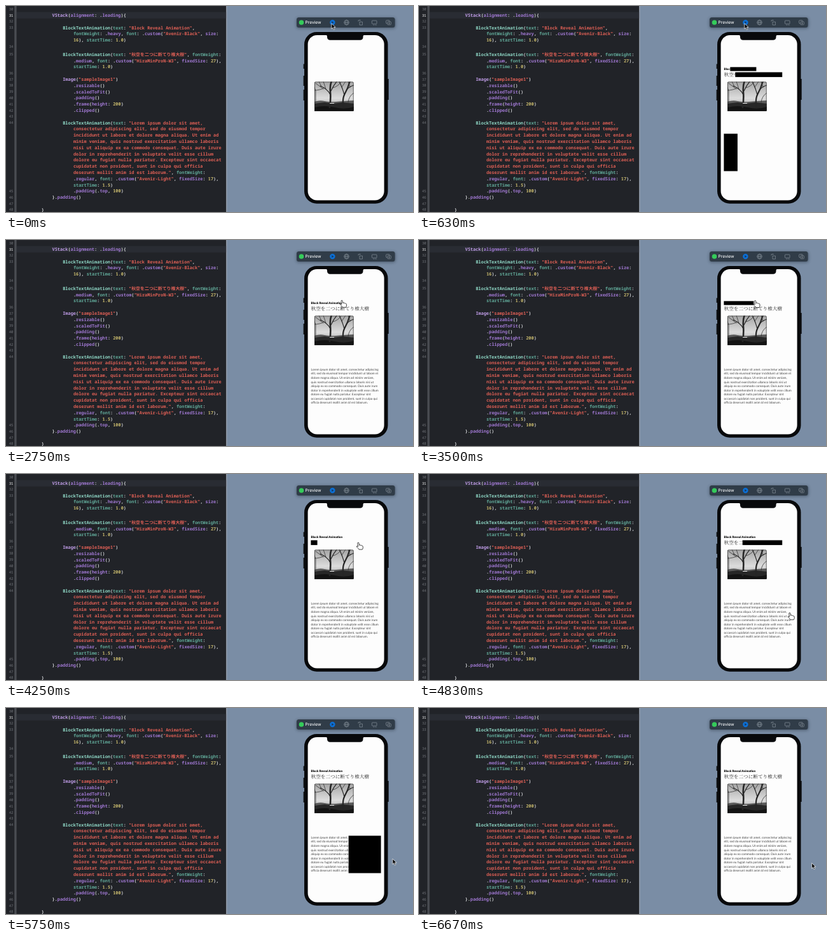
An HTML page for the animation above (6710 ms loop, 640 px wide and 325 px high).

```html
<!DOCTYPE html>
<html lang="en">
<head>
<meta charset="utf-8">
<style>
  html, body { margin: 0; width: 100%; height: 100%; overflow: hidden; background: #7a8da5; }
  svg { display: block; width: 100vw; height: 100vh; }
  text { white-space: pre; text-rendering: geometricPrecision; }
  .code { font: 600 6.93px "Noto Sans Mono", "Noto Sans CJK JP", "DejaVu Sans Mono", monospace; fill: #d3d5d8; }
  .num { font: 5.8px "Noto Sans Mono", monospace; fill: #6f7278; text-anchor: end; }
  .num.active { fill: #fff; }
  .string { fill: #dd5f55; }
  .number { fill: #c3b56b; }
  .own { fill: #8fd8c6; }
  .label { fill: #61a999; }
  .type { fill: #bf9ce6; }
  .member { fill: #a078d2; }
  .title { font: 900 4.65px Lato, sans-serif; }
  .haiku { font: 7.63px "Noto Serif CJK JP", "Noto Sans CJK JP", serif; fill: #222; }
  .body { font: 4.8px Lato, sans-serif; fill: #3c3c3c; }
  .bar { font: 500 6.6px Inter, sans-serif; fill: #f1f3f5; }
</style>
</head>
<body>
<svg viewBox="0 0 640 325" preserveAspectRatio="none">
  <rect width="640" height="325" fill="#7a8da5"/>
  <rect width="346.4" height="325" fill="#212328"/>
  <rect x="16.5" y="9.5" width="329.9" height="10.2" fill="#292c33"/>
  <rect x="13.2" width="3.4" height="325" fill="#494c52"/>
  <rect x="346.4" width="1" height="325" fill="#a3a9b1"/>
  <g id="editor"></g>

  <filter id="soft" x="-10%" y="-60%" width="120%" height="220%"><feGaussianBlur stdDeviation="2"/></filter>
  <rect x="456.5" y="18.6" width="156" height="16.8" rx="4" fill="#26323f" opacity=".5" filter="url(#soft)"/>
  <rect x="457" y="18" width="154.6" height="16" rx="3.5" fill="#303c48"/>
  <circle cx="464.5" cy="26" r="3.8" fill="#35cb5a"/>
  <text class="bar" x="470.5" y="28.4">Preview</text>
  <circle cx="513.4" cy="26" r="4.2" fill="#0b6fd6"/>
  <path d="M512.2 23.9v4.2l3.4-2.1z" fill="#173b63"/>
  <g fill="none" stroke="#88929d" stroke-width=".7">
    <circle cx="535.5" cy="26" r="3.8"/>
    <ellipse cx="535.5" cy="26" rx="1.7" ry="3.8"/>
    <path d="M531.7 26h7.6M554 24.4v-1.8h3.4l-1-1M556 25h4.4v5h-4.4z"/>
    <rect x="575.4" y="23" width="7.6" height="5.2" rx=".8"/>
    <path d="M577.4 30h2M580.6 30h2"/>
    <rect x="597.6" y="22.6" width="5.6" height="5" rx="1"/>
    <rect x="599.8" y="24.6" width="5.6" height="5" rx="1" fill="#303c48"/>
    <path d="M601.2 27.1h2.8M602.6 25.7v2.8"/>
  </g>

  <path d="M468.6 91.5v7.5M468.6 110v16M468.6 132v17M600.8 115v33" stroke="#17191d" stroke-width="2"/>
  <rect x="469" y="41" width="131.5" height="270.8" rx="19.5" fill="#08090b"/>
  <rect x="474.6" y="46" width="120" height="260.5" rx="14.5" fill="#fdfdfd"/>
  <path d="M503 45.5h60.5q-2 .5-2 2.5v1q0 4.8-5 4.8h-46.5q-5 0-5-4.8v-1q0-2-2-2.5z" fill="#08090b"/>

  <clipPath id="photo"><rect x="485" y="119.5" width="61.6" height="46.5" rx="1.5"/></clipPath>
  <linearGradient id="sky" x2="0" y2="1">
    <stop stop-color="#a4a4a4"/><stop offset=".55" stop-color="#dcdcdc"/><stop offset="1" stop-color="#999"/>
  </linearGradient>
  <g clip-path="url(#photo)">
    <rect x="485" y="119" width="62" height="48" fill="url(#sky)"/>
    <path d="M485 151q8-3 16-1t18 1 28-2v18h-62z" fill="#5a5a5a"/>
    <path d="M485 154l16-2 14 2 14-2 18 2v13h-62z" fill="#272727"/>
    <path d="M485 160q16-4 32 0t30-1v8h-62z" fill="#131313"/>
    <g fill="none" stroke="#262626" stroke-linecap="round">
      <path d="M509 160q2-14 1-24t2-18" stroke-width="2.6"/>
      <path d="M531 160q-3-13 2-22t8-20" stroke-width="2.2"/>
      <path d="M510 140q-4-9-16-14M511 134q4-9 10-16M532 141q-2-10-8-22M536 132q4-5 11-7" stroke-width="1.2"/>
      <path d="M485 133q9 0 16-4M496 127l-4-8M503 131l-4-12M514 129q8-2 13-9M487 152v-18l-2-6M538 152q1-10 9-15M528 128l6-9M541 128l-3-9M487 122l12 9" stroke-width=".7"/>
    </g>
    <path d="M509 153.5h7" stroke="#eee" stroke-width="1.2"/>
    <rect x="485.3" y="119.8" width="61" height="45.9" rx="1.5" fill="none" stroke="#222" stroke-width=".9"/>
  </g>

  <g id="reveals"></g>
  <path id="arrow" d="M0 0v8.6l2-1.9 1.4 3.2 1.6-.7-1.4-3.1h2.8z" fill="#08090b" stroke="#fff" stroke-width=".7"/>
  <path id="hand" d="M-1.2 1q0-1.2 1.1-1.2t1.1 1.2l.6 3.2.3-.6q1.2-.4 1.7.6 1.4-.5 1.8.6 1.5-.3 1.8 1.2l.1 2.4q-.2 1.5-1 2.4h-5.2q-.7-1.5-2.3-2.8-2-1.6-1.5-2.3t2.3.4z" fill="#fff" stroke="#111" stroke-width=".8" stroke-linejoin="round"/>
</svg>
<script>
const LOOP = 6710;
const HALF = 500;
const $ = id => document.getElementById(id);

function add(parent, tag, attrs = {}, content = '') {
  const node = document.createElementNS('http://www.w3.org/2000/svg', tag);
  for (const key in attrs) node.setAttribute(key, attrs[key]);
  node.textContent = content;
  return parent.appendChild(node);
}

// Each row: line number | indent level | code
const source = `30|0|
31|1|VStack(alignment: .leading){
32|0|
33|2|BlockTextAnimation(text: "Block Reveal Animation",
|3|fontWeight: .heavy, font: .custom("Avenir-Black", size:
|3|16), startTime: 1.0)
34|0|
35|2|BlockTextAnimation(text: "秋空を二つに断てり椎大樹", fontWeight:
|3|.medium, font: .custom("HiraMinProN-W3", fixedSize: 27),
|3|startTime: 1.0)
36|0|
37|2|Image("sampleImage1")
38|3|.resizable()
39|3|.scaledToFit()
40|3|.padding()
41|3|.frame(height: 200)
42|3|.clipped()
43|0|
44|2|BlockTextAnimation(text: "Lorem ipsum dolor sit amet,
|3|consectetur adipiscing elit, sed do eiusmod tempor
|3|incididunt ut labore et dolore magna aliqua. Ut enim ad
|3|minim veniam, quis nostrud exercitation ullamco laboris
|3|nisi ut aliquip ex ea commodo consequat. Duis aute irure
|3|dolor in reprehenderit in voluptate velit esse cillum
|3|dolore eu fugiat nulla pariatur. Excepteur sint occaecat
|3|cupidatat non proident, sunt in culpa qui officia
|3|deserunt mollit anim id est laborum.", fontWeight:
|3|.regular, font: .custom("Avenir-Light", fixedSize: 17),
|3|startTime: 1.5)
45|3|.padding(.top, 100)
46|1|}.padding()
47|0|
48|0|}`;

function tokenClass(token) {
  if (/^\d/.test(token)) return 'number';
  if (token === 'BlockTextAnimation') return 'own';
  if (/^(text|fontWeight|font|startTime)$/.test(token)) return 'label';
  if (/^(VStack|Image)$/.test(token)) return 'type';
  return /^\w/.test(token) ? 'member' : '';
}

function drawEditor() {
  let inString = false;
  source.split('\n').forEach((row, i) => {
    const [number, indent, code] = row.split('|');
    const y = 7.1 + 9.8 * i + (i > 6 ? 3 : 0);
    add($('editor'), 'text', { class: number === '31' ? 'num active' : 'num', x: 11.6, y: y - .3 }, number);
    const line = add($('editor'), 'text', { class: 'code', x: 55.8 + 16.7 * indent, y });
    for (const token of code.match(/"|[\d.]*\d|[A-Za-z]\w*|[^\w"]+|\w+/g) || []) {
      const quote = token === '"';
      add(line, 'tspan', { class: inString || quote ? 'string' : tokenClass(token) }, token);
      if (quote) inString = !inString;
    }
  });
}

const paragraph = `Lorem ipsum dolor sit amet, consectetur adipiscing
elit, sed do eiusmod tempor incididunt ut labore et
dolore magna aliqua. Ut enim ad minim veniam,
quis nostrud exercitation ullamco laboris nisi ut
aliquip ex ea commodo consequat. Duis aute irure
dolor in reprehenderit in voluptate velit esse cillum
dolore eu fugiat nulla pariatur. Excepteur sint
occaecat cupidatat non proident, sunt in culpa qui
officia deserunt mollit anim id est laborum.`;

const LEFT = 479.4;
const reveals = [
  { style: 'title', text: 'Block Reveal Animation', baseline: 101, top: 96.4, width: 51, height: 6.2, starts: [-22, 3100] },
  { style: 'haiku', text: '秋空を二つに断てり椎大樹', baseline: 111.2, top: 104.5, width: 91.8, height: 7.6, starts: [-22, 4135] },
  { style: 'body', text: paragraph, baseline: 205.9, top: 201.5, width: 110.2, height: 59, starts: [478, 4990] }
];

for (const r of reveals) {
  const id = 'clip-' + r.style;
  r.clip = add(add($('reveals'), 'clipPath', { id }), 'rect', { x: LEFT - 1, y: r.top - 2, height: r.height + 4 });
  const group = add($('reveals'), 'g', { 'clip-path': `url(#${id})` });
  r.text.split('\n').forEach((line, i) =>
    add(group, 'text', { class: r.style, x: LEFT + .2, y: r.baseline + 6.54 * i }, line));
  r.block = add($('reveals'), 'rect', { y: r.top, height: r.height });
}

// Standard ease-in-out, cubic-bezier(.42, 0, .58, 1)
function ease(x) {
  x = Math.min(1, Math.max(0, x));
  let low = 0, high = 1;
  for (let i = 0; i < 18; i++) {
    const s = (low + high) / 2, u = 1 - s;
    if (1.26 * s * u * u + 1.74 * s * s * u + s ** 3 < x) low = s; else high = s;
  }
  return high * high * (3 - 2 * high);
}

function updateReveal(r, t) {
  const start = r.starts.findLast(s => t >= s);
  const elapsed = start === undefined ? 0 : t - start;
  const head = ease(elapsed / HALF) * r.width;
  const tail = elapsed > HALF ? ease((elapsed - HALF) / HALF) * r.width : 0;
  r.block.setAttribute('x', LEFT + tail);
  r.block.setAttribute('width', head - tail > .7 ? head - tail : 0);
  r.clip.setAttribute('width', tail && tail + (tail > r.width - .1 ? 12 : 1));
}

// Pointer stops: time, x, y
const stops = [
  [0, 511.8, 27.5], [2200, 511.8, 27.5], [2700, 528.2, 95.4], [3450, 528.2, 95.4],
  [3950, 554, 108.3], [4350, 554, 108.3], [4850, 583, 219.4], [5400, 583, 219.4],
  [5670, 606.5, 237], [6000, 617.6, 244.6], [LOOP, 617.6, 244.6]
];

function updatePointer(t) {
  const i = stops.findIndex(stop => stop[0] > t);
  const [t0, x0, y0] = stops[i - 1], [t1, x1, y1] = stops[i];
  const k = ease((t - t0) / (t1 - t0));
  const x = x0 + (x1 - x0) * k, y = y0 + (y1 - y0) * k;
  const overPhone = x > 469 && x < 600 && y > 41;
  for (const id of ['arrow', 'hand']) {
    $(id).setAttribute('transform', `translate(${x} ${y})`);
    $(id).setAttribute('visibility', (id === 'hand') === overPhone ? 'visible' : 'hidden');
  }
}

function render(t) {
  reveals.forEach(r => updateReveal(r, t));
  updatePointer(t);
}

drawEditor();
render(0);
const begin = performance.now();
(function tick() {
  render((performance.now() - begin) % LOOP);
  requestAnimationFrame(tick);
})();
</script>
</body>
</html>
```
